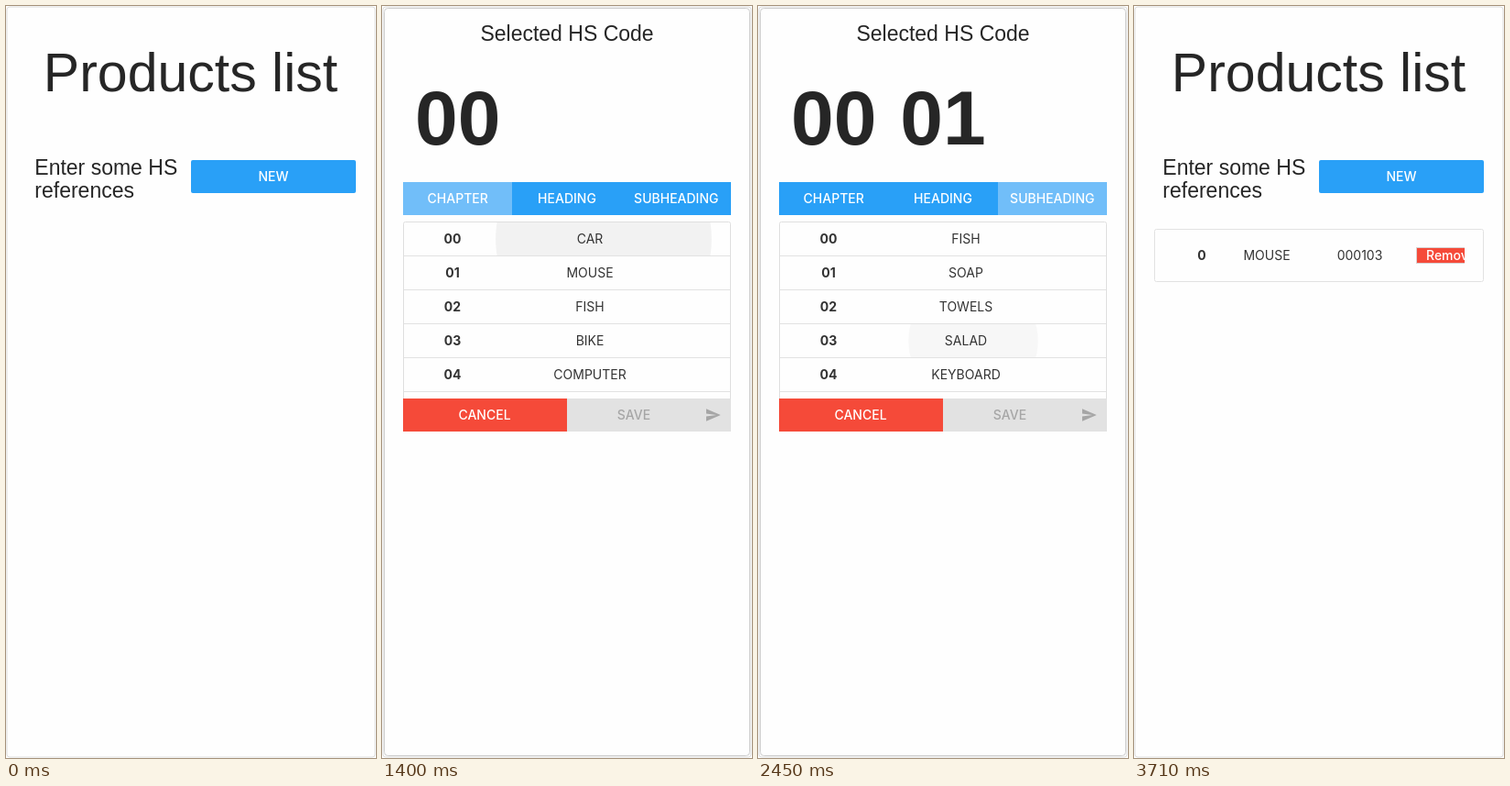
An HTML page with a canvas that plays this animation: 404x820 px, repeating every 3.78 s.

```html
<!DOCTYPE html>
<html lang="en">
<head>
<meta charset="utf-8">
<title>Products list</title>
<style>
  html, body { margin: 0; width: 100%; height: 100%; overflow: hidden; background: #fefefe; }
  canvas { display: block; }
</style>
</head>
<body>
<canvas id="stage" width="404" height="820"></canvas>
<script>
const ctx = document.getElementById('stage').getContext('2d');
const LOOP = 3780, STEP = 70;
const SANS = '"Liberation Sans", Arial, sans-serif';
const UI = 'Inter, Roboto, sans-serif';
const INK = '#262626', BLUE = [41, 160, 247], PALE_BLUE = [113, 190, 249], RED = '#f54a39';

// Moments (ms) at which each press takes effect
const OPEN = 420, CHAPTER = 1400, HEADING = 2030, SUBHEADING = 2590, SAVED = 3640;
const TAB_SWITCHES = [1610, 2240];

const LISTS = [
  ['MOUSE', 'BACON', 'HAT', 'FISH', 'COMPUTER'],
  ['CAR', 'MOUSE', 'FISH', 'BIKE', 'COMPUTER'],
  ['FISH', 'SOAP', 'TOWELS', 'SALAD', 'KEYBOARD']
];
const ROW_PRESSES = [
  { row: 0, x: 242, start: 1050, release: CHAPTER },
  { row: 1, x: 237, start: 1725, release: HEADING },
  { row: 3, x: 235, start: 2240, release: SUBHEADING }
];
const SEND_ICON = new Path2D('M2 21L23 12 2 3v7l15 2-15 2z');

const clamp = v => Math.max(0, Math.min(1, v));
const progress = (t, start, duration) => clamp((t - start) / duration);
const mix = (a, b, k) => `rgb(${a.map((v, i) => Math.round(v + (b[i] - v) * k))})`;

function text(str, x, y, font, color = INK, align = 'center') {
  ctx.font = font;
  ctx.fillStyle = color;
  ctx.textAlign = align;
  ctx.fillText(str, x, y);
}

const label = (str, x, y, weight = 400, color = '#333') =>
  text(str, x, y, `${weight} 14px ${UI}`, color);

function box(x, y, w, h, color, radius = 0) {
  ctx.fillStyle = color;
  ctx.beginPath();
  ctx.roundRect(x, y, w, h, radius);
  ctx.fill();
}

function outline(x, y, w, h, color, radius) {
  ctx.strokeStyle = color;
  ctx.lineWidth = 1;
  ctx.beginPath();
  ctx.roundRect(x, y, w, h, radius);
  ctx.stroke();
}

function clipped(x, y, w, h, draw) {
  ctx.save();
  ctx.beginPath();
  ctx.rect(x, y, w, h);
  ctx.clip();
  draw();
  ctx.restore();
}

// Slow growth while held, faster growth and a fade after release
function ripple(t, { start, release, x, y }, area, color, alphaAt) {
  if (t < start) return;
  const held = Math.min(t, release) - start;
  const free = Math.max(0, t - release);
  const radius = held * 0.337 + free * 0.6;
  const alpha = alphaAt(radius) * (1 - progress(free, 180, 240));
  if (alpha <= 0) return;
  clipped(...area, () => {
    ctx.globalAlpha = alpha;
    ctx.fillStyle = color;
    ctx.beginPath();
    ctx.arc(x, y, radius, 0, 7);
    ctx.fill();
  });
}

const rowShade = r => Math.min(0.09, r * 0.0004);
const buttonGlow = () => 0.1;

function drawProducts(t) {
  text('Products list', 201.5, 93, `59px ${SANS}`);
  text('Enter some HS', 31.3, 184, `23px ${SANS}`, INK, 'left');
  text('references', 31.3, 209, `23px ${SANS}`, INK, 'left');

  box(202, 168, 180, 36, mix(BLUE, BLUE, 0), 2);
  if (t < OPEN) {
    ripple(t, { start: 70, release: OPEN, x: 290, y: 186 }, [202, 168, 180, 36], '#fff', buttonGlow);
  }
  label('NEW', 292, 191, 500, '#fff');

  if (t < SAVED) return;
  outline(22.5, 243.5, 359, 57, '#e2e2e2', 2);
  label('0', 74, 277, 700);
  label('MOUSE', 145, 277);
  label('000103', 246.5, 277);
  clipped(308, 263, 53, 18, () => {
    box(308, 263, 80, 18, '#d8d0d0');
    box(309, 264, 80, 16, RED);
    text('Remove', 319, 277, `500 14px ${UI}`, '#fff', 'left');
  });
}

function drawTabs(t) {
  const [toHeading, toSubheading] = TAB_SWITCHES.map(s => progress(t, s, 140));
  const active = [1 - toHeading, toHeading - toSubheading, toSubheading];
  const edges = [23, 142, 262, 381];
  ['CHAPTER', 'HEADING', 'SUBHEADING'].forEach((name, i) => {
    box(edges[i], 192, edges[i + 1] - edges[i], 36, mix(BLUE, PALE_BLUE, active[i]));
    label(name, 82.7 + i * 119.3, 215, 500, '#fff');
  });
}

function drawList(t) {
  const names = LISTS[t < CHAPTER ? 0 : t < HEADING ? 1 : 2];
  clipped(23, 235, 358, 193, () => {
    for (const press of ROW_PRESSES) {
      const top = 236 + press.row * 37;
      ripple(t, { ...press, y: top + 18 }, [24, top, 356, 36], '#000', rowShade);
    }
    outline(23.5, 235.5, 357, 230, '#dfdfdf', 2);
    names.forEach((name, i) => {
      const y = 259 + i * 37;
      box(24, y + 13, 356, 1, '#e2e2e2');
      label('0' + i, 77, y, 700);
      label(name, 227, y);
    });
  });
}

function drawActions(t) {
  const enabled = progress(t, SUBHEADING, 215);
  const ink = mix([166, 166, 166], [255, 255, 255], enabled);
  box(23, 428, 179, 36, RED);
  box(202, 428, 179, 36, mix([226, 226, 226], [86, 185, 92], enabled));
  ripple(t, { start: 3228, release: SAVED, x: 246, y: 446 }, [202, 428, 179, 36], '#fff', buttonGlow);
  label('CANCEL', 112, 451, 500, '#fff');
  label('SAVE', 275, 451, 500, ink);
  ctx.save();
  ctx.translate(352.5, 437);
  ctx.scale(0.75, 0.75);
  ctx.fillStyle = ink;
  ctx.fill(SEND_ICON);
  ctx.restore();
}

function drawSelector(t) {
  outline(2.5, 2.5, 399, 815, '#cdcdcd', 4);
  text('Selected HS Code', 202, 38, `23px ${SANS}`);
  [['00', CHAPTER], ['01', HEADING], ['03', SUBHEADING]].forEach(([code, shownAt], i) => {
    if (t >= shownAt) text(code, 82.7 + i * 119.3, 151, `bold 84px ${SANS}`);
  });
  drawTabs(t);
  drawList(t);
  drawActions(t);
}

function frame() {
  const t = Math.floor((performance.now() % LOOP) / STEP) * STEP;
  box(0, 0, 404, 820, '#fefefe');
  outline(1, 1, 402, 818, '#dedede', 3);
  if (t >= OPEN && t < SAVED) drawSelector(t);
  else drawProducts(t);
  requestAnimationFrame(frame);
}
frame();
</script>
</body>
</html>
```
